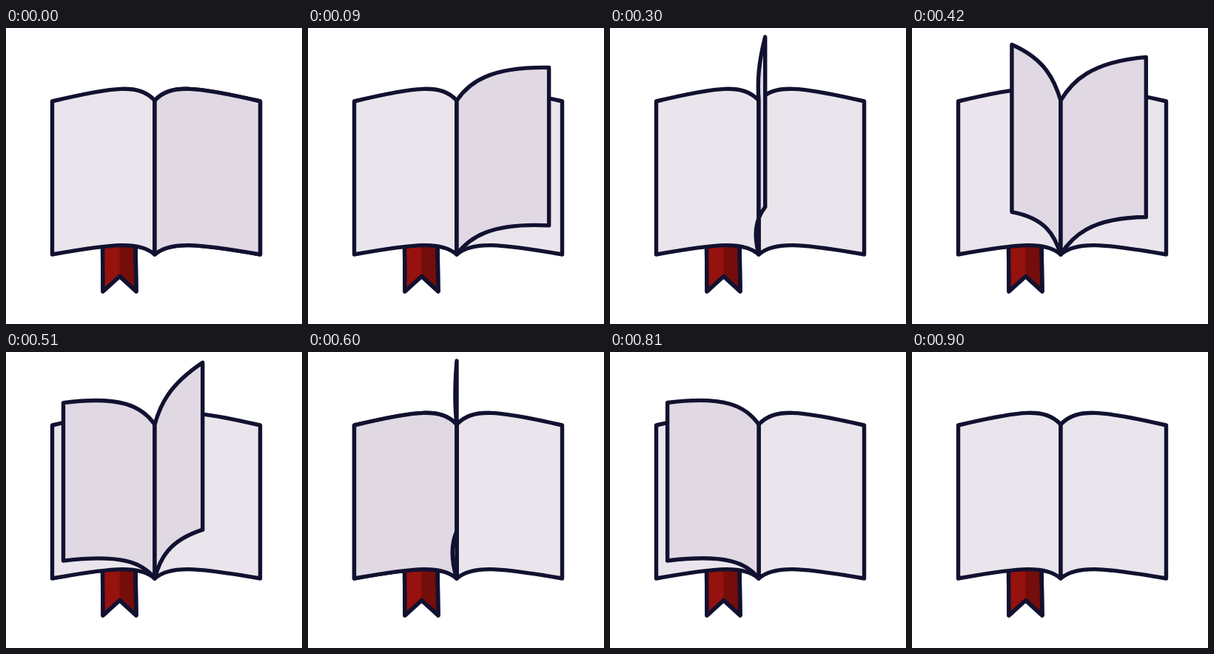
An HTML page that plays this animation: 400x400 px, repeating every 2930 ms.

```html
<!DOCTYPE html>
<html lang="en">
<head>
<meta charset="utf-8">
<title>Book</title>
<style>
html, body { margin: 0; width: 100%; height: 100%; overflow: hidden; background: #fff; }
svg { display: block; width: 100%; height: 100%; }
path { stroke: #111130; stroke-width: 5.4; stroke-linejoin: round; stroke-linecap: round; }
.paper { fill: #eae5ec; }
.leaf { fill: #e0d9e4; }
</style>
</head>
<body>
<svg viewBox="0 0 400 400">
  <path d="M130.5 290L131 356L153.5 335.5L176 356L175 290" fill="#750d0a"/>
  <path d="M130.5 290L131 356L153.5 335.5V290Z" style="fill:#95120e;stroke:none"/>
  <path d="M130.5 290L131 356L153.5 335.5L176 356L175 290" fill="none"/>
  <path id="left" class="paper"/>
  <path id="right" class="paper"/>
  <path id="first" class="leaf"/>
  <path id="second" class="leaf"/>
</svg>
<script>
const LOOP = 2930, STEP = 30, SPINE = 201;

// Sag of the raised edges and sharpness of the bend on each side of the spine
const RIGHT = { span: 142.5, topSag: 8, bottomSag: -12, bend: 3 };
const LEFT = { span: 138.5, topSag: 44, bottomSag: 27, bend: 1.7 };

// Turning angle in degrees at a few times in ms
const LEAVES = [
  { id: "first", until: 630, turn: [[0, 0], [180, 58], [300, 86.5], [420, 118.5], [580, 180]] },
  { id: "second", until: 900, turn: [[300, 0], [900, 180]] }
];

function angleAt(turn, t) {
  const i = turn.findIndex(key => key[0] > t);
  if (i < 0) return 180;
  const [[t0, a0], [t1, a1]] = [turn[i - 1], turn[i]];
  return a0 + (a1 - a0) * (t - t0) / (t1 - t0);
}

// u runs from 1 (flat right) through 0 (upright) to -1 (flat left)
function pagePath(u) {
  const side = u > 0 ? RIGHT : LEFT;
  const reach = u * side.span;
  const bend = Math.abs(u) ** side.bend;
  const upright = Math.exp(-12 * u * u);

  const edge = (apex, rest, sag) => apex + sag * u ** 2 + (rest - apex - sag) * u ** 6;
  const nearX = bulge => SPINE + 16 * u + 5 * u ** 5 - bulge * upright;
  const farX = bulge => SPINE + reach * (0.27 + 0.12 * u * u) - bulge * upright;

  const top = edge(12, 99, side.topSag);
  const bottom = edge(242, 306, side.bottomSag);
  return `M${SPINE} 98C${nearX(3)} ${72 + 3 * u ** 6} ` +
    `${farX(3)} ${top + 36 - 56 * bend} ${SPINE + reach} ${top}V${bottom}` +
    `C${farX(8)} ${bottom + 18 - 33 * bend} ` +
    `${nearX(8)} ${280 + 8 * u ** 6} ${SPINE} 306Z`;
}

const setPath = (id, d) => document.getElementById(id).setAttribute("d", d);

function draw(now) {
  const t = Math.floor((now % LOOP) / STEP) * STEP;
  for (const { id, until, turn } of LEAVES) {
    const start = turn[0][0];
    const shown = t < until && (t > start || start === 0);
    setPath(id, shown ? pagePath(Math.cos(angleAt(turn, t) * Math.PI / 180)) : "");
  }
}

setPath("left", pagePath(-1));
setPath("right", pagePath(1));

const begin = performance.now();
function tick() {
  draw(performance.now() - begin);
  requestAnimationFrame(tick);
}
tick();
</script>
</body>
</html>
```
